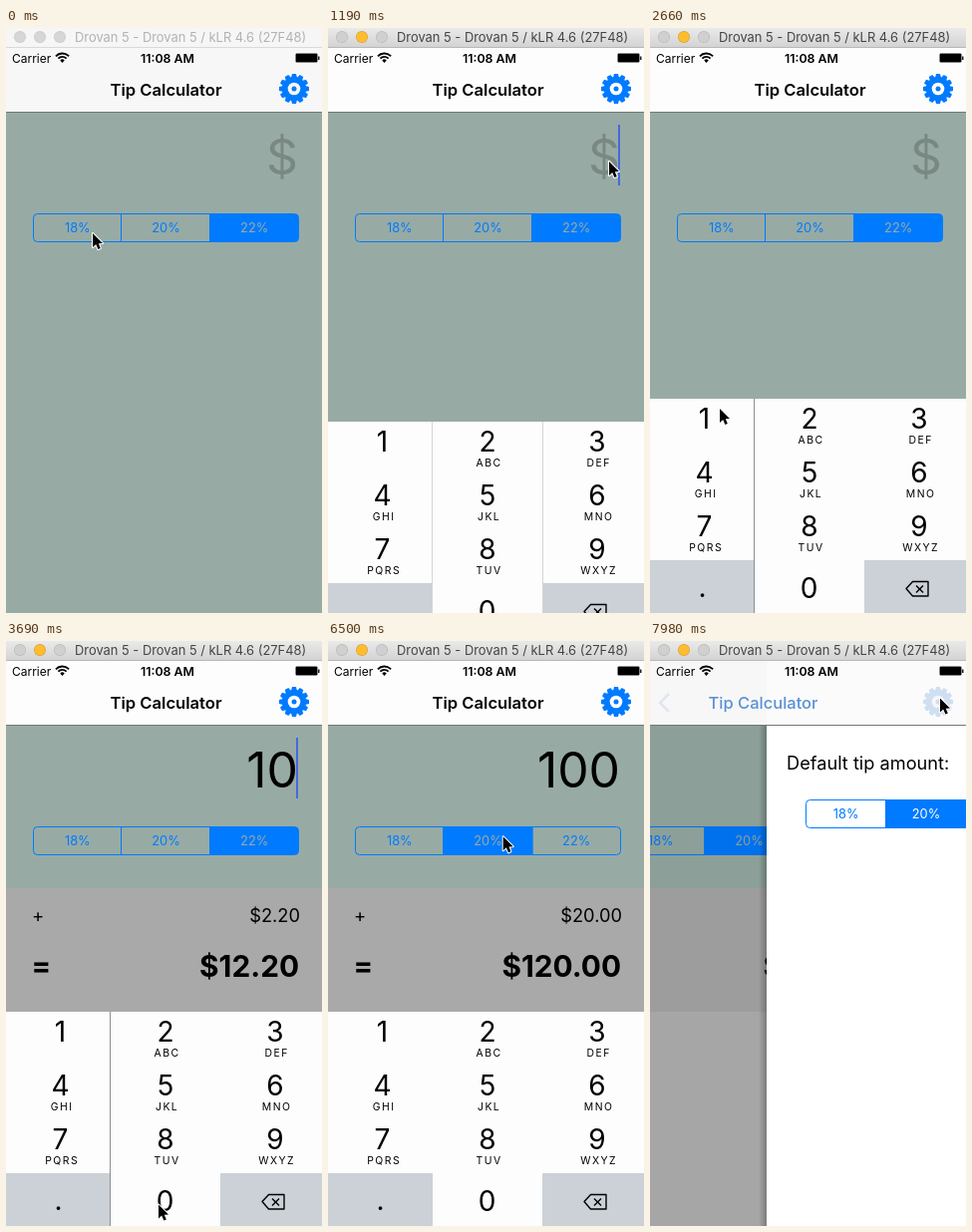
Write an HTML page with a canvas that moves like this. It is 317 by 587 pixels and loops after 8000 ms.

```html
<!DOCTYPE html>
<html lang="en">
<head>
<meta charset="utf-8">
<title>Tip Calculator</title>
<style>
html, body { margin: 0; width: 100%; height: 100%; overflow: hidden; background: #fff; }
canvas { display: block; width: 317px; height: 587px; }
</style>
</head>
<body>
<canvas id="stage"></canvas>
<script>
const W = 317, H = 587, LOOP = 8000, STEP = 147.8;
const BLUE = '#007aff', GREEN = '#97aba4', GRAY = '#a9a9a9', KEY_GRAY = '#cbd1d7';
const canvas = document.getElementById('stage');
const ctx = canvas.getContext('2d');
const dpr = window.devicePixelRatio || 1;
canvas.width = W * dpr;
canvas.height = H * dpr;

// Pointer paths: start step, end step, then a quadratic curve
const MOVES = [
  [0, 6, 87, 206, 190, 190, 282, 134],
  [8, 17, 282, 134, 150, 230, 70, 382],
  [20, 24, 70, 382, 110, 520, 153, 565.5],
  [29, 35, 153, 565.5, 115, 380, 163, 203],
  [43, 49, 163, 203, 250, 160, 297, 45],
  [49, 51, 297, 45, 296, 52, 291, 57.5]
];
const LETTERS = ['', 'ABC', 'DEF', 'GHI', 'JKL', 'MNO', 'PQRS', 'TUV', 'WXYZ'];
const KEY_MID = [54.5, 160, 270];

const clamp = v => Math.max(0, Math.min(1, v));
const ease = v => v * v * (3 - 2 * v);

function rect(x, y, w, h, color) {
  ctx.fillStyle = color;
  ctx.fillRect(x, y, w, h);
}

function disc(x, y, r, color) {
  ctx.beginPath();
  ctx.arc(x, y, r, 0, Math.PI * 2);
  ctx.fillStyle = color;
  ctx.fill();
}

function text(str, x, y, size, color = '#000', align = 'left', weight = 400, spacing = 0) {
  ctx.font = `${weight} ${size}px Inter, "Liberation Sans", sans-serif`;
  ctx.letterSpacing = spacing + 'px';
  ctx.textAlign = align;
  ctx.fillStyle = color;
  ctx.fillText(str, x, y);
}

function poly(points, close) {
  ctx.beginPath();
  points.forEach(([x, y], i) => i ? ctx.lineTo(x, y) : ctx.moveTo(x, y));
  if (close) ctx.closePath();
}

function stroke(color, width) {
  ctx.strokeStyle = color;
  ctx.lineWidth = width;
  ctx.stroke();
}

function titleBar(active) {
  if (active) {
    const g = ctx.createLinearGradient(0, 0, 0, 20);
    g.addColorStop(0, '#eaeaea');
    g.addColorStop(1, '#d2d2d2');
    rect(0, 0, W, 20, g);
    rect(0, 19, W, 1, '#b8b8b8');
  } else {
    rect(0, 0, W, 20, '#f6f6f6');
    rect(0, 19, W, 1, '#dadada');
  }
  for (let i = 0; i < 3; i++) {
    const lit = active && i === 1;
    disc(14 + i * 20, 9, 6, lit ? '#dea034' : active ? '#b9b9b9' : '#cacaca');
    disc(14 + i * 20, 9, 5.3, lit ? '#fdbd2f' : active ? '#d0d0d0' : '#d6d6d6');
  }
  text('Drovan 5 - Drovan 5 / kLR 4.6 (27F48)', 69, 14, 12.9, active ? '#454545' : '#b2b2b2');
}

function statusBar() {
  text('Carrier', 6, 34.5, 12);
  text('11:08 AM', 162, 34.5, 12.4, '#000', 'center', 600);
  for (const r of [9, 5.6]) {
    ctx.beginPath();
    ctx.arc(56.5, 34.5, r, -Math.PI * 0.76, -Math.PI * 0.24);
    stroke('#000', 1.8);
  }
  ctx.beginPath();
  ctx.moveTo(56.5, 35);
  ctx.arc(56.5, 34.5, 3, -Math.PI * 0.76, -Math.PI * 0.24);
  ctx.fillStyle = '#000';
  ctx.fill();
  ctx.beginPath();
  ctx.roundRect(290.5, 25.5, 22, 9, 1.5);
  stroke('#888', 1);
  rect(291, 26, 21, 8, '#000');
  rect(313, 28.5, 1.5, 3.5, '#222');
}

function gear(color, back) {
  ctx.save();
  ctx.translate(289, 61);
  disc(0, 0, 12, color);
  for (let i = 0; i < 12; i++) {
    poly([[-3, -11], [-2, -15], [2, -15], [3, -11]], true);
    ctx.fill();
    ctx.rotate(Math.PI / 6);
  }
  disc(0, 0, 6.3, back);
  disc(0, 0, 2.5, color);
  ctx.restore();
}

function segments(x, y, width, selected, back) {
  const part = width / 3, h = 28;
  const edge = i => Math.round(x + part * i - 1);
  ctx.save();
  ctx.beginPath();
  ctx.roundRect(x, y, width, h, 4);
  ctx.save();
  ctx.clip();
  rect(edge(selected), y, part + 2, h, BLUE);
  ctx.restore();
  stroke(BLUE, 1);
  for (let i = 1; i < 3; i++) rect(edge(i), y, 1, h, BLUE);
  ['18%', '20%', '22%'].forEach((s, i) =>
    text(s, x + part * (i + 0.5), y + 18.5, 12.8, i === selected ? back : BLUE, 'center'));
  ctx.restore();
}

function form(amount, rate, panel, caret) {
  rect(0, 85, W, H - 85, GREEN);
  if (panel > 0) {
    ctx.globalAlpha = panel;
    rect(0, 248, W, H - 248, GRAY);
    const tip = amount * rate / 100;
    text('+', 26, 282, 18.5);
    text('=', 25.5, 336, 29, '#000', 'left', 700);
    text('$' + tip.toFixed(2), 295, 282, 18.3, '#000', 'right');
    text('$' + (amount + tip).toFixed(2), 294, 336.5, 29.8, '#000', 'right', 700);
    ctx.globalAlpha = 1;
  }
  text(amount ? String(amount) : '$', 293, 146.5, 49.8, amount ? '#000' : '#7a8884', 'right');
  if (caret) rect(291, 97, 2, 61, '#4468df');
  segments(27.5, 186.5, 266, (rate - 18) / 2, GREEN);
}

function deleteIcon() {
  ctx.lineJoin = 'round';
  poly([[257, 562.5], [263.5, 555.5], [279, 555.5], [279, 570], [263.5, 570]], true);
  stroke('#000', 1.4);
  poly([[267, 559.5], [274, 566.5]]);
  stroke('#000', 1.4);
  poly([[274, 559.5], [267, 566.5]]);
  stroke('#000', 1.4);
}

function keypad(offset, pressed, leftLine) {
  const sliding = offset > 0;
  ctx.save();
  ctx.translate(0, offset);
  rect(0, 372, W, 215, '#fdfdfd');
  rect(0, 534, 105, 53, KEY_GRAY);
  rect(215, 534, 102, 53, KEY_GRAY);
  if (pressed === 1) rect(0, 372, 105, 54, KEY_GRAY);
  if (pressed === 0) rect(105, 534, 110, 53, KEY_GRAY);
  if (leftLine) rect(104, 372, 1, 215, sliding ? '#d3d5d7' : '#8b8d90');
  if (sliding) rect(215, 372, 1, 215, '#d3d5d7');
  LETTERS.forEach((s, i) => {
    const x = KEY_MID[i % 3], y = 402 + Math.floor(i / 3) * 54;
    text(String(i + 1), x, y, 28, '#000', 'center');
    text(s, x + 1.6, y + 15, 10.4, '#000', 'center', 400, 1.5);
  });
  text('.', 52.5, 571, 28, '#000', 'center');
  text('0', 159.5, 571.5, 28, '#000', 'center');
  deleteIcon();
  ctx.restore();
}

function settings(edge) {
  const g = ctx.createLinearGradient(edge - 8, 0, edge, 0);
  g.addColorStop(0, 'rgba(0,0,0,0)');
  g.addColorStop(1, 'rgba(0,0,0,.25)');
  rect(edge - 8, 85, 8, H - 85, g);
  rect(edge, 85, W - edge, H - 85, '#fff');
  text('Default tip amount:', edge + 20, 129, 18.2);
  segments(edge + 39.5, 159.5, 241, 1, '#fff');
}

function pointer(x, y) {
  ctx.save();
  ctx.translate(x, y);
  poly([[0, 0], [0, 14], [3.2, 11], [5.4, 16], [7.8, 15], [5.8, 10.2], [10, 10]], true);
  ctx.lineJoin = 'round';
  stroke('#fff', 2);
  ctx.fillStyle = '#000';
  ctx.fill();
  ctx.restore();
}

function pointerAt(k) {
  const [a, b, x0, y0, cx, cy, x1, y1] = MOVES.filter(m => k >= m[0]).pop();
  const p = ease(clamp((k - a) / (b - a))), q = 1 - p;
  return [q * q * x0 + 2 * q * p * cx + p * p * x1, q * q * y0 + 2 * q * p * cy + p * p * y1];
}

function draw(time) {
  const k = Math.min(54, Math.floor((time + 10) / STEP));
  const active = k >= 6, pushing = k >= 54;
  const amount = k < 20 ? 0 : k < 25 ? 1 : k < 27 ? 10 : 100;
  const rate = k < 38 ? 22 : 20;
  const typing = (k >= 20 && k < 23) || (k >= 25 && k < 30);
  const caret = k >= 7 && (typing || [6, 0, 1].includes(k % 7));
  const bar = active && !pushing ? '#fdfdfd' : '#f7f7f7';

  ctx.setTransform(dpr, 0, 0, dpr, 0, 0);
  ctx.save();
  if (pushing) ctx.translate(-61, 0);
  form(amount, rate, clamp((k - 19) / 2), caret);
  ctx.restore();

  if (pushing) {
    rect(0, 85, W, H - 85, 'rgba(0,0,0,.07)');
    rect(0, 372, 117, H - 372, '#a6a6a6');
    settings(117);
  } else if (k >= 7) {
    const offset = k === 7 ? 120 : k === 8 ? 23 : 0;
    keypad(offset, k === 19 ? 1 : k === 26 ? 0 : -1, k < 39);
  }

  rect(0, 20, W, 65, bar);
  if (pushing) rect(117, 20, W - 117, 64, '#fbfbfb');
  rect(0, 84, W, 1, '#6f7a76');
  titleBar(active);
  statusBar();
  if (pushing) {
    text('Tip Calculator', 113.5, 68, 16.5, '#5a90d6', 'center', 500);
    poly([[19, 53], [10, 62], [19, 71]]);
    stroke('#dfe6ef', 2.5);
  } else {
    text('Tip Calculator', 160.5, 68, 16.6, '#000', 'center', 600);
  }
  gear(pushing ? '#cfdff2' : k >= 52 ? '#bfdcfb' : BLUE, bar);
  pointer(...pointerAt(k));
}

function tick() {
  draw(performance.now() % LOOP);
  requestAnimationFrame(tick);
}
tick();
</script>
</body>
</html>
```
